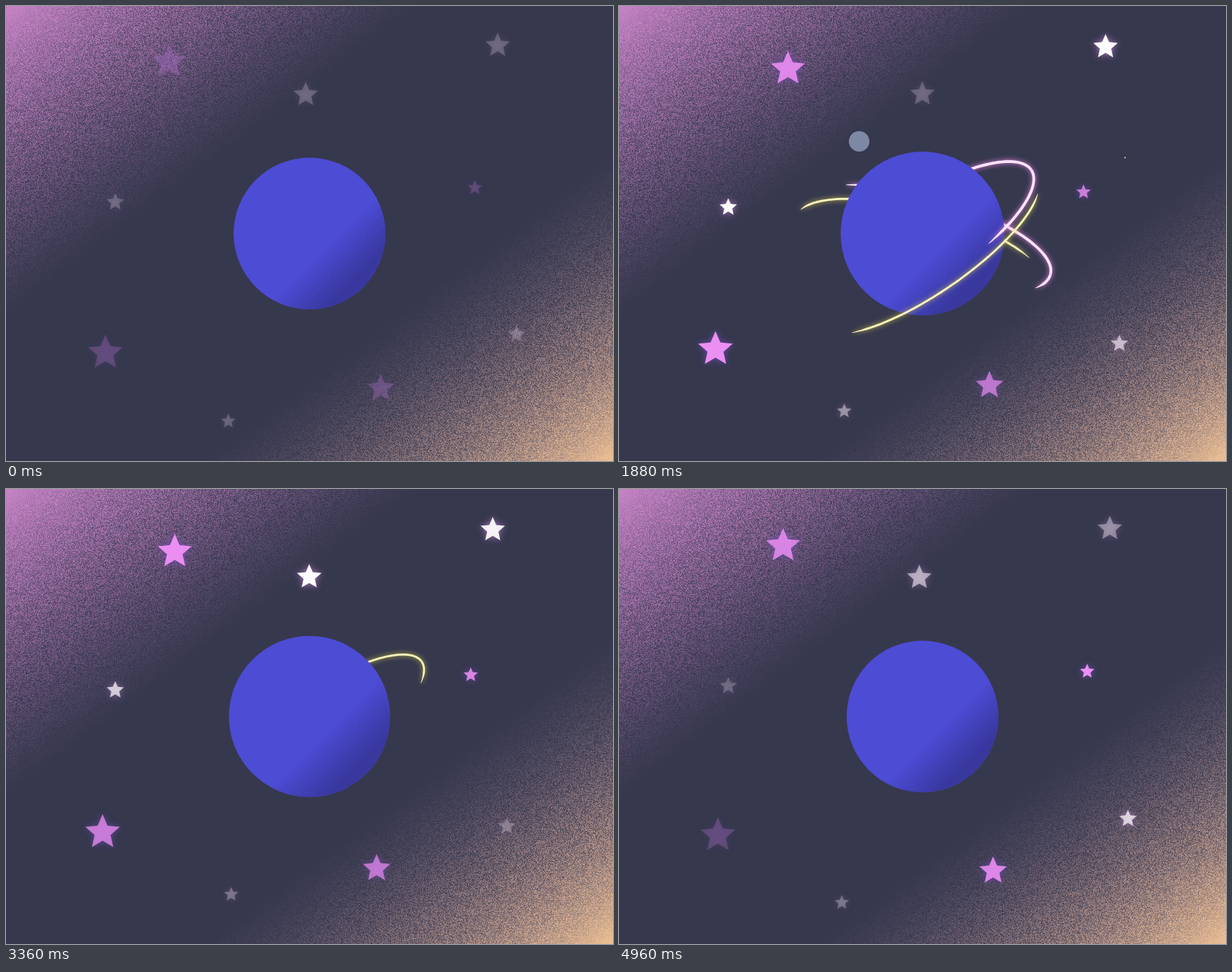
Recreate the animation shown at these times as an HTML page with a canvas. Size 800 px wide and 600 px high, loop 5 s.

```html
<!DOCTYPE html>
<html lang="en">
<head>
<meta charset="utf-8">
<title>Planet</title>
<style>
html, body { margin: 0; width: 100%; height: 100%; overflow: hidden; background: #36384e; }
canvas { display: block; width: 800px; height: 600px; }
</style>
</head>
<body>
<canvas id="stage" width="800" height="600"></canvas>
<script>
const W = 800, H = 600, LOOP = 5, STEP = 0.04, RAD = Math.PI / 180;
const ctx = document.getElementById('stage').getContext('2d');

const clamp = (v, lo = 0, hi = 1) => Math.min(hi, Math.max(lo, v));
const mix = (a, b, k) => a + (b - a) * k;

function seeded(seed) {
  return () => {
    seed = (seed + 0x6D2B79F5) | 0;
    let h = Math.imul(seed ^ (seed >>> 15), 1 | seed);
    h = (h + Math.imul(h ^ (h >>> 7), 61 | h)) ^ h;
    return ((h ^ (h >>> 14)) >>> 0) / 4294967296;
  };
}

// Builds an off-screen picture from a per-pixel rule returning [r, g, b, a].
function paint(w, h, rule) {
  const c = document.createElement('canvas');
  c.width = w;
  c.height = h;
  const g = c.getContext('2d'), img = g.createImageData(w, h);
  for (let y = 0, i = 0; y < h; y++)
    for (let x = 0; x < w; x++, i += 4) img.data.set(rule(x, y), i);
  g.putImageData(img, 0, 0);
  return c;
}

const rnd = seeded(7);
// Speckle is strongest halfway through a fade and absent at its ends.
const grainy = (level, amount) => clamp(level + (rnd() - 0.5) * amount * level * (1 - level));

const NIGHT = [54, 56, 78], ORCHID = [198, 131, 198], MAUVE = [165, 128, 158], PEACH = [238, 193, 149];

const sky = paint(W, H, (x, y) => {
  const u = x / (2 * W) + y / (2 * H);
  const strength = clamp(1 - 2.9 * Math.min(u, 1 - u));
  const level = grainy(strength ** 1.3, 2.6);
  return [...NIGHT.map((n, i) => {
    const tint = u < 0.5 ? ORCHID[i] : mix(MAUVE[i], PEACH[i], strength);
    return mix(n, tint, level);
  }), 255];
});

const shade = paint(240, 240, (x, y) => {
  const s = (x + y - 240) / (Math.SQRT2 * 120);
  return [57, 56, 158, 255 * grainy(clamp((s - 0.28) / 0.57), 1.2)];
});

const PINK = { fill: '#ec8ff2', glow: 'rgba(120,75,190,.85)' };
const WHITE = { fill: '#fff', glow: 'rgba(215,140,225,.75)' };

// dx, dy: drift at mid-loop; fade: seconds from dim to bright.
const STARS = [
  { ...PINK, x: 215, y: 72, r: 23.5, dx: 8, dy: 10, fade: 0.68 },
  { ...WHITE, x: 395, y: 116, r: 17, dx: 5, dy: -1, fade: 0.475 },
  { ...WHITE, x: 648, y: 51, r: 17, dx: -7, dy: 2, fade: 0.645 },
  { ...WHITE, x: 144, y: 258, r: 12, dx: 0, dy: 7, fade: 0.62 },
  { ...PINK, x: 618, y: 239, r: 10, dx: -6, dy: 6, fade: 0.71 },
  { ...PINK, x: 131, y: 456, r: 24, dx: -4, dy: -5, fade: 0.625 },
  { ...WHITE, x: 293, y: 547, r: 10, dx: 4, dy: -14, fade: 0.8 },
  { ...PINK, x: 494, y: 503, r: 19, dx: -6, dy: -4, fade: 0.735 },
  { ...WHITE, x: 673, y: 432, r: 12, dx: -14, dy: 13, fade: 0.34 }
];

function drawStars(t) {
  const drift = Math.sqrt(Math.sin(Math.PI * t / LOOP));
  for (const s of STARS) {
    ctx.save();
    ctx.globalAlpha = 0.2 + 0.4 * (1 - Math.cos(Math.PI * t / s.fade));
    ctx.fillStyle = s.fill;
    ctx.shadowColor = s.glow;
    ctx.shadowBlur = 9;
    ctx.translate(s.x + s.dx * drift, s.y + s.dy * drift + s.r * 0.06);
    ctx.beginPath();
    for (let i = 0; i < 10; i++) {
      const d = i % 2 ? s.r * 0.46 : s.r, a = (i * 36 - 90) * RAD;
      ctx.lineTo(d * Math.cos(a), d * Math.sin(a));
    }
    ctx.fill();
    ctx.restore();
  }
}

function disc(x, y, r) {
  ctx.beginPath();
  ctx.arc(x, y, r, 0, 2 * Math.PI);
}

const SAND = { color: 'rgb(232,198,156)', max: 30 };
const ICE = { color: 'rgb(185,205,236)', max: 20 };
const PULSES = [
  { ...SAND, x: 424, y: 54, start: 0.075 },
  { ...SAND, x: 210, y: 462, start: 0.7 },
  { ...ICE, x: 316.5, y: 178.5, start: 1.306 },
  { ...SAND, x: 667, y: 200, start: 1.852 },
  { ...ICE, x: 429, y: 484, start: 2 },
  { ...SAND, x: 424, y: 54, start: 3.94 }
];

function drawPulses(t) {
  for (const { x, y, max, color, start } of PULSES) {
    const p = (t - start) / 0.85;
    if (p <= 0 || p >= 1) continue;
    ctx.globalAlpha = 1 - p * p;
    ctx.fillStyle = color;
    disc(x, y, max * p);
    ctx.fill();
  }
  ctx.globalAlpha = 1;
}

const ROSE = { fill: '#fde4fb', glow: '#ee86ea', width: 3.4 };
const LEMON = { fill: '#f9f5bb', glow: '#d6cb4e', width: 2.5 };

// Angles in degrees: the tail runs from phase at speed, changing by accel.
const TRAILS = [
  { ...LEMON, cx: -3, cy: 21.5, a: 157, b: 50, tilt: 5.5, turn: 5.3,
    phase: -493, speed: 474, accel: -117, length: 135, born: 0.3, dies: 3.1 },
  { ...ROSE, cx: 0, cy: 7, a: 162, b: 52.5, tilt: 5.5, turn: 5.3,
    phase: -456, speed: 474, accel: -117, length: 155, born: 0.3, dies: 3.1 },
  { ...LEMON, cx: 6.5, cy: 23, a: 161, b: 49.5, tilt: -34.5, turn: 0,
    phase: -443, speed: 157, accel: 95, length: 125, born: 1.2, dies: 3.9 },
  { ...ROSE, cx: 0, cy: 8, a: 158, b: 52, tilt: -32.7, turn: 0,
    phase: -470, speed: 405, accel: 0, length: 134, born: 0.6, dies: 3.1 }
];

// A closed band along the ellipse, narrowing towards both ends of the trail.
function ribbon(trail, start, end, tail, head) {
  const count = Math.max(2, Math.ceil((end - start) / 2));
  const outer = [], inner = [];
  for (let i = 0; i <= count; i++) {
    const deg = mix(start, end, i / count);
    const c = Math.cos(deg * RAD), s = Math.sin(deg * RAD);
    const nx = c * trail.b, ny = s * trail.a, n = Math.hypot(nx, ny);
    const half = trail.width / 2 * clamp(Math.min(deg - tail, head - deg) / 12 + 0.2);
    const x = trail.a * c, y = trail.b * s;
    outer.push([x + nx / n * half, y + ny / n * half]);
    inner.unshift([x - nx / n * half, y - ny / n * half]);
  }
  ctx.beginPath();
  [...outer, ...inner].forEach(([x, y]) => ctx.lineTo(x, y));
  ctx.closePath();
  ctx.fill();
}

function drawTrails(t, scale, front) {
  for (const trail of TRAILS) {
    const grown = clamp(Math.min(t - trail.born, trail.dies - t) / 0.5);
    if (!grown) continue;
    const tail = trail.phase + trail.speed * t + trail.accel * t * t / 2;
    const head = tail + trail.length * grown;
    ctx.save();
    ctx.translate(400, 300);
    ctx.scale(scale, scale);
    ctx.translate(trail.cx, trail.cy);
    ctx.rotate((trail.tilt + trail.turn * t) * RAD);
    ctx.fillStyle = trail.fill;
    ctx.shadowColor = trail.glow;
    ctx.shadowBlur = 6;
    // Even half turns pass in front of the planet, odd ones behind it.
    for (let h = Math.floor(tail / 180); h * 180 < head; h++) {
      if ((h % 2 === 0) !== front) continue;
      ribbon(trail, Math.max(tail, h * 180), Math.min(head, h * 180 + 180), tail, head);
    }
    ctx.restore();
  }
}

function drawPlanet(r) {
  ctx.save();
  disc(400, 300, r);
  ctx.fillStyle = '#4d4cd5';
  ctx.fill();
  ctx.clip();
  ctx.drawImage(shade, 400 - r, 300 - r, 2 * r, 2 * r);
  ctx.restore();
}

function draw(t) {
  const swing = 1 - Math.abs(2 * t / LOOP - 1);
  const scale = 1 + 0.128 * (1 - Math.cos(swing * Math.PI / 2));
  ctx.drawImage(sky, 0, 0);
  drawStars(t);
  drawPulses(t);
  drawTrails(t, scale, false);
  drawPlanet(100 * scale);
  drawTrails(t, scale, true);
}

const begin = performance.now();
function tick() {
  const t = (performance.now() - begin) / 1000 % LOOP;
  draw(Math.floor(t / STEP) * STEP);
  requestAnimationFrame(tick);
}
tick();
</script>
</body>
</html>
```
